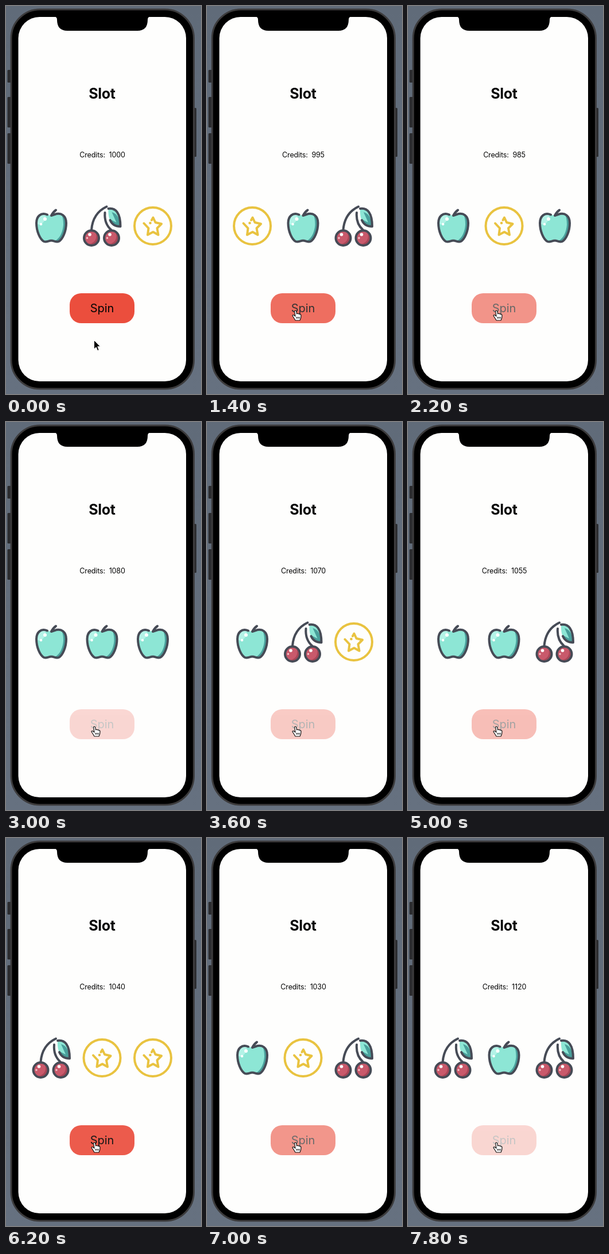
An HTML page for the animation above (8000 ms loop, 340 px wide and 674 px high).

```html
<!DOCTYPE html>
<html lang="en">
<head>
<meta charset="utf-8">
<title>Slot</title>
<style>
  html, body { margin: 0; width: 100%; height: 100%; overflow: hidden; background: #626d7b; }
  svg { display: block; width: 340px; height: 674px; }
  text { font-family: Inter, Roboto, sans-serif; text-anchor: middle; white-space: pre; fill: #050505; }
  .ink { stroke: #464b56; stroke-width: 4; stroke-linecap: round; stroke-linejoin: round; }
  .gold { fill: none; stroke: #e9c340; stroke-width: 4; stroke-linecap: round; stroke-linejoin: round; }
</style>
</head>
<body>
<svg viewBox="0 0 340 674">
  <defs>
    <linearGradient id="wall" x2="0" y2="1">
      <stop stop-color="#606b79"/><stop offset="1" stop-color="#667180"/>
    </linearGradient>

    <!-- Symbols are centred on x = 0 -->
    <g id="apple">
      <path id="appleBody" fill="#8de6d5" d="M-7 362.500C-18 358-26 365-26 377C-26 391-20 405-13 409C-8 411-5 407.500 0 407.500C5 407.500 8 411 13 409C20 405 26 391 26 377C26 365 18 358 6 362L0 364Z"/>
      <path fill="#499f9b" d="M17 361C28 362 28 381 24 392C20 403 15 411 7 408C16 402 20 392 21 380C21 372 20 366 17 361Z"/>
      <path fill="#b3f3e7" d="M-10 363C-19 361-25 369-24 379C-18 382-8 373-10 363Z"/>
      <g fill="#fff"><circle cx="-11" cy="370" r="3"/><circle cx="-18" cy="379" r="2.300"/></g>
      <path class="ink" fill="none" d="M-7 362.500C-18 358-26 365-26 377C-26 391-20 405-13 409C-8 411-5 407.500 0 407.500C5 407.500 8 411 13 409C20 405 26 391 26 377C26 365 18 358 6 362L0 364Q3 358 8 354.500"/>
    </g>

    <g id="berry">
      <circle r="13" fill="#c9596b"/>
      <path fill="#a94657" d="M7-11A13 13 0 0 1-7 11C6 10 11 1 7-11Z"/>
      <circle cx="-3" cy="-6" r="2.800" fill="#fff"/><circle cx="-7.500" cy="0" r="1.700" fill="#f3c5ca"/>
      <circle class="ink" r="13" fill="none"/>
    </g>
    <g id="cherry">
      <path fill="#8de6d5" d="M11 352C24 350 32 360 32 383C17 383 10 373 11 352Z"/>
      <path fill="#499f9b" d="M17 358C27 361 31 370 31 382C20 381 15 377 13 370L25 376Z"/>
      <path class="ink" fill="none" d="M11 352C24 350 32 360 32 383C23 383 17 379 14 372M-18.500 389C-17 370-8 356 8 348.500M16 389C8 382 4 371 5 359"/>
      <use href="#berry" x="-18.500" y="403"/>
      <use href="#berry" x="16.500" y="403"/>
    </g>

    <g id="star">
      <circle class="gold" cy="382" r="32"/>
      <path class="gold" d="M-2 372L.5 367.500L4.500 376L15 378.500L7.500 386L9.500 397.500L.5 392.500L-9 397.500L-7.500 386L-15.500 377.500"/>
      <circle cx="-4.500" cy="377" r="2.300" fill="#e9c340"/>
    </g>
  </defs>

  <rect width="340" height="674" fill="url(#wall)"/>
  <g fill="#2b2c2f">
    <rect x="2.500" y="111" width="7" height="22" rx="1.500"/>
    <rect x="2.500" y="158" width="7" height="53" rx="1.500"/>
    <rect x="2.500" y="221" width="7" height="53" rx="1.500"/>
    <rect x="326" y="177" width="6" height="85" rx="1.500"/>
  </g>
  <rect x="9" y="6" width="318.500" height="659" rx="50" fill="#000" stroke="#3c3b3c" stroke-width="3"/>
  <rect x="21.500" y="19" width="292.500" height="633" rx="37" fill="#fefefd"/>
  <path d="M85 18.500Q89 19 89 24Q89 43 107 43H229Q247 43 247 24Q247 19 251 18.500Z"/>

  <text x="167.500" y="161" font-size="25" font-weight="700" letter-spacing="-.3">Slot</text>
  <text id="credits" x="168" y="262.500" font-size="12.500"  letter-spacing="-.15"></text>
  <use class="reel" x="79"/><use class="reel" x="167.500"/><use class="reel" x="256"/>

  <g id="button">
    <rect x="111" y="499" width="113" height="52" rx="20" fill="#eb4e3d"/>
    <text x="167.500" y="532" font-size="20">Spin</text>
  </g>

  <path id="arrow" d="M0 0V15.500L3.600 12.200L6.200 18.200L8.700 17L6.200 11.200H11Z" stroke="#fff" stroke-width="1"/>
  <path id="hand" fill="#fff" stroke="#111" stroke-width="1.200" stroke-linejoin="round"
    d="M-1.500 1Q0-1 1.500 1L2.500 6Q4 4 5.500 6Q7 5 8 7Q10 6 10 9L9.500 13L8 17H0L-3 12L-5 9Q-5 7-2.500 8L0 10ZM2 11V14M4.500 11V14M7 11V14"/>
</svg>
<script>
const LOOP = 8000, STEP = 200, COST = 5, PRIZE = 100;
const SYMBOLS = { A: "#apple", C: "#cherry", S: "#star" };

// Release time of each tap and the reels it brings up.
const spins = [
  [1130, "SAC"], [1590, "CAS"], [2025, "ASA"], [2520, "AAA"],
  [3080, "SCA"], [3560, "ACS"], [4056, "ASS"], [4480, "CSA"],
  [4930, "AAC"], [5250, "SAS"], [5570, "ACA"], [5885, "CSS"],
  [6350, "SCA"], [6830, "ASC"], [7300, "CCC"], [7790, "CAC"]
];
const HOLD = 100, FADE = 350, DIM = 0.22;

const $ = id => document.getElementById(id);
const reels = document.querySelectorAll(".reel");
const clamp = v => Math.min(1, Math.max(0, v));
const mix = (a, b, k) => a + (b - a) * k;

function buttonOpacity(t, last) {
  if (spins.some(([up]) => t >= up - HOLD && t < up)) return DIM;
  return last ? mix(0.2, 1, clamp((t - last[0]) / FADE)) : 1;
}

function drawCursor(t) {
  const p = clamp((t - 200) / 700), k = p * p * (3 - 2 * p);
  const x = mix(153.5, 154, k), y = mix(580.5, 529, k);
  const over = y < 551;
  for (const [id, shown] of [["arrow", !over], ["hand", over]]) {
    $(id).setAttribute("transform", `translate(${x} ${y})`);
    $(id).style.display = shown ? "" : "none";
  }
}

function draw(t) {
  const done = spins.filter(([up]) => up <= t);
  const last = done[done.length - 1];
  const faces = last ? last[1] : "ACS";
  const wins = done.filter(([, f]) => f[0] === f[1] && f[1] === f[2]).length;
  $("credits").textContent = `Credits:\u00a0 ${1000 - COST * done.length + PRIZE * wins}`;
  reels.forEach((reel, i) => reel.setAttribute("href", SYMBOLS[faces[i]]));
  $("button").setAttribute("opacity", buttonOpacity(t, last));
  drawCursor(t);
}

const start = performance.now();
function tick() {
  const t = (performance.now() - start) % LOOP;
  draw(Math.floor(t / STEP) * STEP);
  requestAnimationFrame(tick);
}
tick();
</script>
</body>
</html>
```
